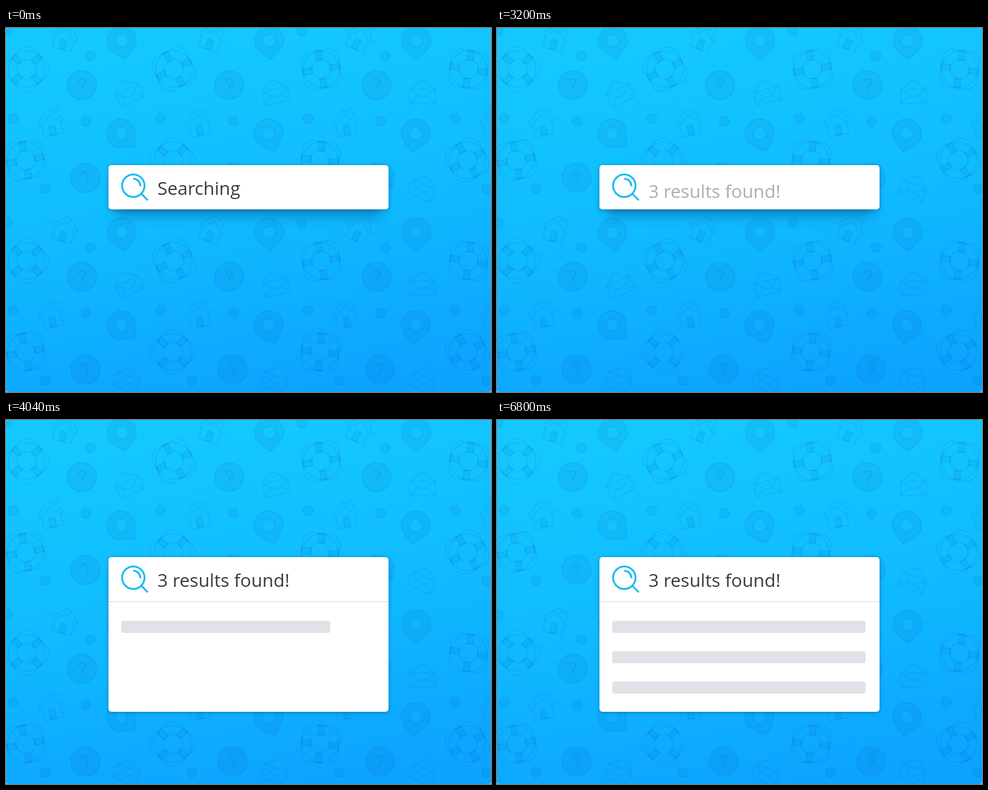
An HTML page with a canvas that plays this animation: 800 by 600 pixels, repeating every 6860 ms.

```html
<!DOCTYPE html>
<html lang="en">
<head>
<meta charset="utf-8">
<title>Search results</title>
<style>
html, body { margin: 0; width: 100%; height: 100%; overflow: hidden; background: #fff; }
canvas { display: block; width: 800px; height: 600px; }
</style>
</head>
<body>
<canvas id="stage" width="800" height="600"></canvas>
<script>
const W = 800, H = 600, LOOP = 6860;
const COLUMN = 243, ROW = 316;
const TAU = Math.PI * 2, RAD = Math.PI / 180;
const ctx = document.getElementById('stage').getContext('2d');
const backdrop = document.createElement('canvas');
backdrop.width = W;
backdrop.height = H;

function disc(c, r) {
  c.beginPath();
  c.arc(0, 0, r, 0, TAU);
}

function shade(c, alpha = 1) {
  c.globalAlpha = alpha;
  c.fill();
  c.globalAlpha = 1;
  c.stroke();
}

const icons = {
  dot(c) {
    disc(c, 8);
    shade(c);
  },
  help(c) {
    disc(c, 24);
    shade(c);
    c.lineWidth = 3;
    c.beginPath();
    c.arc(0, -4, 5.5, Math.PI, TAU + 0.7);
    c.quadraticCurveTo(0, 1, 0, 5);
    c.stroke();
    c.fillRect(-2, 8, 4, 4);
  },
  pin(c) {
    c.beginPath();
    c.arc(0, 0, 24, Math.PI - 0.35, TAU + 0.35);
    c.quadraticCurveTo(15, 20, 0, 31);
    c.quadraticCurveTo(-15, 20, -22.5, 8.2);
    c.closePath();
    c.moveTo(10, 0);
    c.arc(0, 0, 10, 0, TAU, true);
    shade(c);
  },
  ring(c) {
    disc(c, 30);
    c.stroke();
    disc(c, 16);
    c.stroke();
    for (let i = 0; i < 4; i++) {
      c.rotate(TAU / 8);
      c.beginPath();
      c.rect(15, -5, 16, 10);
      shade(c);
      c.rotate(TAU / 8);
      c.beginPath();
      c.moveTo(22, -22);
      c.lineTo(35, -9);
      c.quadraticCurveTo(39, 0, 35, 9);
      c.lineTo(22, 22);
      c.stroke();
    }
  },
  mail(c) {
    c.stroke(new Path2D('M-21-4 0-20 21-4V19H-21Z M-21-4 0 10 21-4 M-21 19-6 6 M21 19 6 6 M-21-4H21'));
  },
  house(c) {
    c.stroke(new Path2D('M-22-2 0-22 8-15V-20H15V-8L22-2 18 3 0-13-18 3Z M-16 2V21H16V2'));
    c.beginPath();
    c.rect(-5, 5, 10, 16);
    shade(c);
  }
};

// kind, x, y, degrees, extra degrees per column, column width
const motif = [
  ['ring', 34, 68, 0, 18], ['house', 97, 15, 15, 4], ['pin', 191, 21, -8, 4],
  ['help', 125, 94], ['mail', 201, 105, -27, 13],
  ['house', 74, 156, -12], ['pin', 190, 174, -48, 29], ['dot', 132, 154], ['dot', 12, 149],
  ['ring', 32, 218, 34, -36], ['help', 131, 247, -16, 12], ['mail', 202, 262, 22],
  ['dot', 64, 265], ['dot', 139, 46, 0, 0, 2 * COLUMN], ['dot', 2, 5, 0, 0, 2 * COLUMN]
];

function paintBackdrop() {
  const c = backdrop.getContext('2d');
  const g = c.createLinearGradient(350, 0, 450, 600);
  g.addColorStop(0, '#14c8ff');
  g.addColorStop(0.5, '#10bbff');
  g.addColorStop(1, '#0ca4ff');
  c.beginPath();
  c.roundRect(0, 0, W, H, [0, 0, 3, 3]);
  c.clip();
  c.fillStyle = g;
  c.fillRect(0, 0, W, H);

  c.fillStyle = 'rgba(0,75,160,.075)';
  c.strokeStyle = 'rgba(0,75,160,.1)';
  c.lineJoin = 'round';
  for (const [kind, x, y, deg = 0, step = 0, pitch = COLUMN] of motif) {
    for (let k = 0; x + k * pitch < W + 40; k++) {
      for (let py = y - ROW; py < H + 40; py += ROW) {
        c.save();
        c.translate(x + k * pitch, py);
        c.rotate((deg + step * k) * RAD);
        c.lineWidth = 1.7;
        icons[kind](c);
        c.restore();
      }
    }
  }
}

// cubic-bezier(.25, .1, .25, 1)
function ease(x) {
  if (x <= 0) return 0;
  if (x >= 1) return 1;
  let lo = 0, hi = 1;
  for (let i = 0; i < 24; i++) {
    const s = (lo + hi) / 2, r = 1 - s;
    if (0.75 * r * s + s * s * s < x) lo = s;
    else hi = s;
  }
  const s = lo, r = 1 - s;
  return 0.3 * r * r * s + 3 * r * s * s + s * s * s;
}

const span = (t, start, length) => ease((t - start) / length);

function box(x, y, w, h, r, color) {
  ctx.beginPath();
  ctx.roundRect(x, y, w, h, r);
  ctx.fillStyle = color;
  ctx.fill();
}

function shadowBox(x, y, w, h, drop, blur, alpha) {
  ctx.save();
  ctx.shadowColor = `rgba(0,20,50,${alpha})`;
  ctx.shadowOffsetY = drop;
  ctx.shadowBlur = blur;
  box(x, y, w, h, 5, '#fff');
  ctx.restore();
}

function label(text, alpha, dy) {
  ctx.globalAlpha = alpha;
  ctx.font = '30px "Open Sans", "Noto Sans", sans-serif';
  ctx.fillStyle = '#3a3a3a';
  ctx.fillText(text, 249.7, 274.5 + dy);
  ctx.globalAlpha = 1;
}

function lens(turn) {
  ctx.save();
  ctx.translate(210, 260);
  ctx.strokeStyle = '#1cbaf2';
  ctx.lineWidth = 3;
  disc(ctx, 18.5);
  ctx.stroke();
  ctx.stroke(new Path2D('M13 13 24 24'));
  ctx.rotate(turn);
  ctx.beginPath();
  ctx.arc(0, 0, 11.5, -TAU / 4, 0.08);
  ctx.stroke();
  ctx.restore();
}

function draw(t) {
  ctx.clearRect(0, 0, W, H);
  ctx.drawImage(backdrop, 0, 0);

  const open = span(t, 3500, 400);
  shadowBox(181, 236, 438, 63, 9, 20, 0.34);
  shadowBox(169, 226, 462, 73 + 182 * open, 1, 6, 0.3);
  if (open > 0) {
    ctx.fillStyle = '#d2d4d6';
    ctx.fillRect(169, 299, 462, 1);
  }

  lens(t > 20 && t < 3020 ? (t - 20) / 1000 * TAU : 0);

  const out = span(t, 2900, 200), into = span(t, 3100, 400);
  if (t < 3100) label('Searching', 1 - out, -10 * out);
  else label('3 results found!', into, 10 * (1 - into));

  for (let i = 0; i < 3; i++) {
    const w = 418 * span(t, 3800 + 300 * i, 460);
    if (w > 0) box(190, 331 + 50 * i, w, 20, 4, '#dfe2e7');
  }
}

paintBackdrop();
const start = performance.now();
function tick() {
  draw((performance.now() - start) % LOOP);
  requestAnimationFrame(tick);
}
tick();
</script>
</body>
</html>
```
